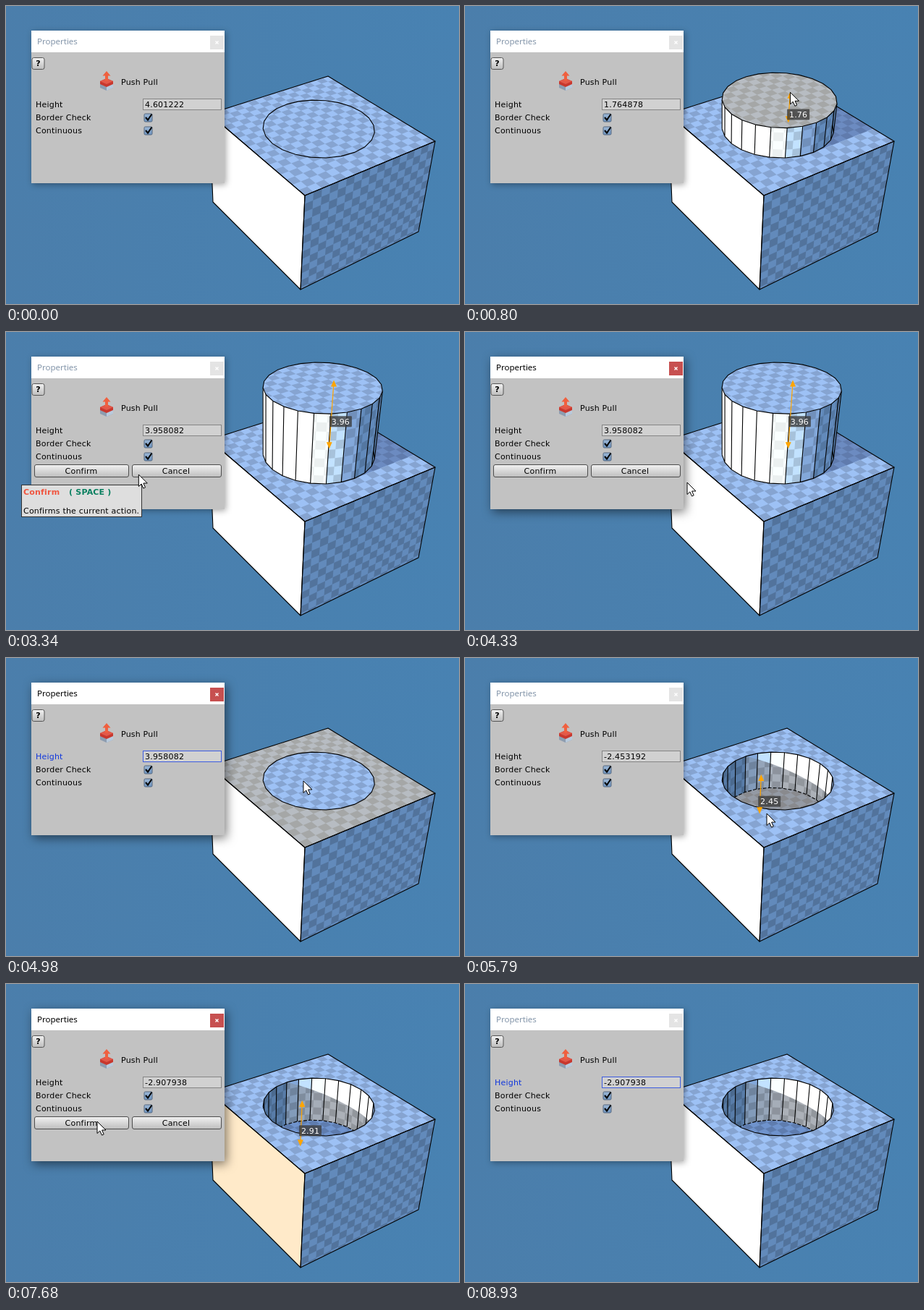
An HTML page for the animation above (9050 ms loop, 626 by 412 pixels).

```html
<!DOCTYPE html>
<html lang="en">
<head>
<meta charset="utf-8">
<title>Push Pull</title>
<style>
html, body { margin: 0; width: 100%; height: 100%; overflow: hidden; background: #4a80ae; }
svg { display: block; }
text { font: 11px "DejaVu Sans", sans-serif; letter-spacing: .2px; white-space: pre; }
.title { font: 11.5px "Noto Sans", sans-serif; letter-spacing: 0; }
.bold { font-weight: bold; }
.edge { fill: none; stroke: #000; stroke-width: 1.1; stroke-linejoin: round; }
</style>
</head>
<body>
<svg width="626" height="412" viewBox="0 0 626 412">
  <defs>
    <linearGradient id="sky"><stop stop-color="#4b7eab"/><stop offset="1" stop-color="#4882b2"/></linearGradient>
    <linearGradient id="button" x2="0" y2="1"><stop stop-color="#f2f2f2"/><stop offset="1" stop-color="#bdbdbd"/></linearGradient>
    <linearGradient id="box" x2="0" y2="1"><stop stop-color="#9db8d6"/><stop offset="1" stop-color="#6e94c0"/></linearGradient>
    <clipPath id="rim"><path id="rimPath"/></clipPath>
    <clipPath id="cap"><path id="capPath"/></clipPath>
  </defs>
  <rect width="626" height="412" fill="url(#sky)"/>
  <g id="block"></g>
  <g id="solid"></g>
  <g id="gizmo">
    <path id="shaft" fill="none" stroke="#ffa500" stroke-width="1.2"/>
    <path id="heads" fill="#ffa500"/>
    <g id="tag">
      <rect x="-15.5" y="-7.5" width="31" height="15" rx="1" fill="#3c3c3c" fill-opacity=".8"/>
      <text id="length" y="4" text-anchor="middle" fill="#fff"></text>
    </g>
  </g>
  <g id="panel">
    <rect x="35" y="34" width="267" height="211" fill="#c2c2c2"/>
    <rect x="35" y="34" width="267" height="30" fill="#fff"/>
  </g>
  <text class="title" id="title" x="43" y="53">Properties</text>
  <rect id="close" x="282" y="41" width="19" height="19"/>
  <path d="M289.5 48.5l4 4m0-4l-4 4" stroke="#fff" stroke-width="1.3"/>
  <rect x="36" y="71.5" width="17" height="16" rx="2.5" fill="url(#button)" stroke="#555"/>
  <text x="44.5" y="83" text-anchor="middle" class="bold">?</text>
  <path d="M130 107l9-4 9 4v6l-9 4-9-4z" fill="#8d9db0"/>
  <path d="M139 110l9-3v6l-9 4z" fill="#b9cbdd"/>
  <path d="M130 104l9-4 9 4v4l-9 4-9-4z" fill="#c8382e"/>
  <path d="M130 104l9-4 9 4-9 4z" fill="#e2594a"/>
  <path d="M139 90l5.500 6.500h-3.500v7h-4v-7h-3.500z" fill="#f0603f"/>
  <text x="159" y="109">Push Pull</text>
  <text id="heightLabel" x="41" y="140">Height</text>
  <text x="41" y="158">Border Check</text>
  <text x="41" y="176">Continuous</text>
  <rect id="field" x="189.500" y="128.500" width="108" height="15" fill="#d1d1d1"/>
  <text id="value" x="192" y="140"></text>
  <g id="checkbox">
    <rect x="191" y="149" width="11" height="11" rx="1.500" fill="url(#box)" stroke="#52657c"/>
    <path d="M193 154l3 3.500 5.500-8" fill="none" stroke="#000" stroke-width="2"/>
  </g>
  <use href="#checkbox" y="18"/>
  <g id="buttons">
    <rect x="39.500" y="183.500" width="130" height="17" rx="2.500" fill="url(#button)" stroke="#4d4d4d"/>
    <rect x="174.500" y="183.500" width="123" height="17" rx="2.500" fill="url(#button)" stroke="#4d4d4d"/>
    <text x="104" y="196" text-anchor="middle">Confirm</text>
    <text x="235" y="196" text-anchor="middle">Cancel</text>
  </g>
  <g id="tooltip">
    <rect x="21.500" y="211.500" width="166" height="44" fill="#dedede" stroke="#333"/>
    <text class="bold" x="24" y="225" fill="#f0553f">Confirm</text>
    <text class="bold" x="87" y="225" fill="#0a8060">( SPACE )</text>
    <text x="24" y="251">Confirms the current action.</text>
  </g>
  <path id="cursor" d="M0 0V16.500L3.800 13 6.500 19 9.200 17.800 6.600 12H12Z" fill="#fff" stroke="#000" stroke-linejoin="round"/>
</svg>
<script>
const LOOP = 9050, STEP = Math.PI / 12, SEGMENTS = 24, RADIUS = 3.02;
const WIDTH = 8.45, DEPTH = 9.08, HEIGHT = 6.15, CELL = .5, SUN_SLOPE = .25;
const CENTER = { x: 4.25, y: 4.54 }, VIEW = .99;
const TOP = 'rgb(157,193,245)', AMBIENT = [98, 138, 187], SUN = [250, 230, 240];
const el = id => document.getElementById(id);

// Perspective projection of block coordinates (z points up from the top face).
function project(x, y, z = 0) {
  const u = x / WIDTH, v = y / DEPTH, k = z * -.01966;
  const w = 1 + .13092 * u + .21571 * v + k;
  return [(413 + 257.6 * u - 71.4 * v + 357 * k) / w,
          (262 - 50.5 * u - 80.9 * v + 1467 * k) / w];
}
const onCircle = (angle, z = 0) =>
  project(CENTER.x + RADIUS * Math.cos(angle), CENTER.y + RADIUS * Math.sin(angle), z);

const line = points => 'M' + points.map(p => p.map(n => n.toFixed(1)).join(' ')).join('L');
const poly = points => line(points) + 'Z';
const ring = z => poly(Array.from({ length: SEGMENTS }, (_, i) => onCircle(i * STEP, z)));
const shape = (d, fill, opacity = 1, extra = '') =>
  `<path d="${d}" fill="${fill}" fill-opacity="${opacity}" ${extra}/>`;
const edge = d => `<path class="edge" d="${d}"/>`;
const rgb = c => `rgb(${c.map(n => Math.min(255, Math.round(n)))})`;
const mix = (a, b, k) => a.map((n, i) => n + (b[i] - n) * k);

// Every other cell of a grid over [a0,a1] x [b0,b1].
function checks(map, a0, a1, b0, b1) {
  let d = '';
  for (let i = Math.floor(a0 / CELL); i * CELL < a1; i++)
    for (let j = Math.floor(b0 / CELL); j * CELL < b1; j++) {
      if (i + j & 1) continue;
      const l = Math.max(a0, i * CELL), r = Math.min(a1, (i + 1) * CELL);
      const b = Math.max(b0, j * CELL), t = Math.min(b1, (j + 1) * CELL);
      d += poly([map(l, b), map(r, b), map(r, t), map(l, t)]);
    }
  return d;
}

const corner = { front: [413, 262], right: [593, 187], back: [445, 97], left: [281, 149] };
const base = { front: [407, 392], right: [570, 312], left: [286, 271] };
const topFace = poly([corner.front, corner.right, corner.back, corner.left]);
const leftFace = poly([corner.front, corner.left, base.left, base.front]);
const rightFace = poly([corner.front, corner.right, base.right, base.front]);
const topChecks = checks((x, y) => project(x, y), 0, WIDTH, 0, DEPTH);
const glow = d => shape(d, '#ffaf2f', .26, 'fill-rule="evenodd"');

el('block').innerHTML =
  shape(leftFace, '#fff') +
  shape(rightFace, rgb(AMBIENT)) +
  shape(checks((x, z) => project(x, 0, z), 0, WIDTH, -HEIGHT, 0), '#000', .17) +
  shape(topFace, TOP) + shape(topChecks, '#000', .15);
el('rimPath').setAttribute('d', ring(0));

const outline = edge(leftFace) + edge(rightFace) + edge(topFace);
const disc = z => {
  const map = (x, y) => project(x, y, z);
  const cells = checks(map, CENTER.x - RADIUS, CENTER.x + RADIUS, CENTER.y - RADIUS, CENTER.y + RADIUS);
  el('capPath').setAttribute('d', ring(z));
  return `<g clip-path="url(#cap)">${shape(cells, '#000', .15)}</g>`;
};

function wall(i, low, high, fill, contrast) {
  const a = i * STEP, s = a * RADIUS;
  const face = poly([onCircle(a, low), onCircle(a + STEP, low), onCircle(a + STEP, high), onCircle(a, high)]);
  return shape(face, fill, 1, `stroke="${fill}" stroke-width=".4"`) +
    shape(checks((q, z) => onCircle(q / RADIUS, z), s, s + STEP * RADIUS, low, high), '#000', contrast);
}

function castShadow(h) {
  const points = [project(CENTER.x, CENTER.y - RADIUS)];
  for (let i = -6; i <= 6; i++) {
    const x = CENTER.x + h / SUN_SLOPE + RADIUS * Math.cos(i * STEP);
    points.push(project(Math.min(WIDTH, x), CENTER.y + RADIUS * Math.sin(i * STEP)));
  }
  points.push(project(CENTER.x, CENTER.y + RADIUS));
  return shape(poly(points), '#324b80', .45);
}

function cylinder(h, hot) {
  let faces = '', seams = '', foot = [];
  for (let i = 0; i < SEGMENTS; i++) {
    const facing = a => -Math.cos(a - VIEW);
    if (facing((i + .5) * STEP) > -.06) {
      const light = Math.max(0, -Math.cos((i + .5) * STEP));
      const color = AMBIENT.map((n, c) => n + SUN[c] * light);
      faces += wall(i, 0, h, rgb(color), light > .7 ? 0 : light > .5 ? .06 : .14);
    }
    if (facing(i * STEP) > -.1) {
      seams += line([onCircle(i * STEP), onCircle(i * STEP, h)]);
      foot.push(onCircle(i * STEP));
    }
  }
  return castShadow(h) + outline + faces + edge(seams + line(foot)) +
    shape(ring(h), TOP) + disc(h) + (hot ? glow(ring(h)) : '') + edge(ring(h));
}

function hole(h, hot) {
  let inside = shape(ring(h), '#6f93cd') + disc(h) + (hot ? glow(ring(h)) : '');
  let shade = '', seams = '', rear = [];
  const sunDepth = a => -Math.min(-h, 2 * RADIUS * SUN_SLOPE * Math.max(0, Math.cos(a)));
  for (let i = -3; i <= 10; i++) {
    const a = i * STEP, b = a + STEP, light = Math.max(0, Math.cos(a + STEP / 2));
    if (Math.cos(a + STEP / 2 - VIEW) > 0) {
      const dim = light ? mix(AMBIENT, [172, 177, 184], Math.min(1, .3 + light)) : mix(AMBIENT, [0, 0, 0], .1);
      inside += wall(i, h, 0, rgb(dim), .15);
      if (light) shade += shape(poly([onCircle(a), onCircle(b), onCircle(b, sunDepth(b)), onCircle(a, sunDepth(a))]),
        rgb(AMBIENT.map((n, c) => n + SUN[c] * light)));
    }
    if (Math.cos(a - VIEW) > -.05) {
      seams += line([onCircle(a), onCircle(a, h)]);
      rear.push(onCircle(a, h));
    }
  }
  return `<g clip-path="url(#rim)">${inside}${shade}${edge(seams)}
    <path class="edge" d="${line(rear)}" stroke-dasharray="5 2"/></g>` + outline + edge(ring(0));
}

// Piecewise-linear track of [time, value...] keys.
function track(keys, t) {
  const i = keys.findIndex(k => k[0] > t);
  if (i === 0) return keys[0].slice(1);
  if (i < 0) return keys.at(-1).slice(1);
  const [a, b] = [keys[i - 1], keys[i]], k = (t - a[0]) / (b[0] - a[0]);
  return mix(a.slice(1), b.slice(1), k);
}

const PULL = [[600, 0], [1010, 3.6], [1150, 3.958082]];
const PUSH = [[5150, 0], [5650, -2.1], [5790, -2.453192], [5860, -2.453192], [5930, -2.907938]];
const MOUSE = [
  [130, 500, -22], [330, 480, 90], [520, 447, 160], [600, 447, 160], [1010, 452, 77], [1150, 453, 69],
  [1490, 453, 69], [1620, 390, 102], [1900, 200, 175], [2120, 118, 192], [3060, 118, 192], [3340, 183, 197],
  [3500, 235, 203], [3760, 307, 208], [4770, 307, 208], [4980, 411, 170], [5100, 409, 163], [5150, 409, 163],
  [5650, 416, 208], [5790, 417, 215], [5860, 417, 215], [5930, 416, 222], [6450, 416, 222], [6650, 350, 215],
  [7000, 200, 196], [7290, 126, 190], [8110, 126, 190], [8420, 350, 190], [8560, 440, 120], [8740, 500, -22]
];
const HOVER = [
  [330, 460, 'top'], [460, 1560, 'disc'], [4770, 4910, 'left'], [4910, 5050, 'top'], [5050, 6230, 'disc'],
  [6230, 6550, 'top'], [6550, 7750, 'left'], [8380, 8460, 'left'], [8460, 8600, 'top']
];

const within = (t, ...spans) => spans.some(([a, b]) => t >= a && t < b);
const show = (id, on) => { el(id).style.display = on ? '' : 'none'; };
const set = (id, name, value) => el(id).setAttribute(name, value);

function drawGizmo(x, y, h) {
  const from = project(x, y), to = project(x, y, h);
  const [top, bottom] = h > 0 ? [to, from] : [from, to];
  const mid = mix(top, bottom, .5);
  set('shaft', 'd', line([top, bottom]));
  set('heads', 'd', `M${top[0]} ${top[1] - 2}l4 9h-8zM${bottom[0]} ${bottom[1] + 1}l4-9h-8z`);
  set('tag', 'transform', `translate(${mid[0] + 12.5} ${mid[1] + 9.5})`);
  el('length').textContent = Math.abs(h).toFixed(2);
}

let lastScene = '';
function render(t) {
  const pushing = t >= 5150;
  const h = pushing ? track(PUSH, t)[0] : t < 4470 ? track(PULL, t)[0] : 0;
  const hover = (HOVER.find(([a, b]) => t >= a && t < b) || [])[2];
  const scene = h.toFixed(4) + hover;
  if (scene !== lastScene) {
    lastScene = scene;
    const hot = hover === 'disc';
    const under = hover === 'left' ? glow(leftFace) : hover === 'top' ? glow(topFace + ring(0)) : '';
    el('solid').innerHTML = under + (h > .01 ? cylinder(h, hot) : h < -.01 ? hole(h, hot) :
      outline + (hot ? glow(ring(0)) : '') + edge(ring(0)));
  }

  show('gizmo', Math.abs(h) > .01 && within(t, [600, 4470], [5150, 7820]));
  drawGizmo(...(pushing ? [3.69, 5.28] : [5.07, 4.64]), h);

  const active = within(t, [4330, 5080], [7680, 8930]);
  const focused = within(t, [4400, 5080], [7850, LOOP]);
  el('panel').style.filter = active ? 'drop-shadow(3px 4px 7px rgba(0,0,0,.5))' : 'drop-shadow(2px 2px 4px rgba(0,0,0,.35))';
  set('title', 'fill', active ? '#000' : '#8496aa');
  set('close', 'fill', active ? '#c75050' : '#e4e4e4');
  set('heightLabel', 'fill', focused ? '#1238dc' : '#000');
  set('field', 'stroke', focused ? '#3d5ce0' : '#858585');
  el('value').textContent = t < 600 ? '4.601222' : (t >= 4470 && !pushing ? 3.958082 : h).toFixed(6);
  show('buttons', within(t, [1340, 4470], [6230, 7820]));
  show('tooltip', within(t, [2560, 3410]));
  show('cursor', within(t, [130, 8740]));
  set('cursor', 'transform', `translate(${track(MOUSE, t)})`);
}

const start = performance.now();
function tick() {
  render((performance.now() - start) % LOOP);
  requestAnimationFrame(tick);
}
tick();
</script>
</body>
</html>
```
